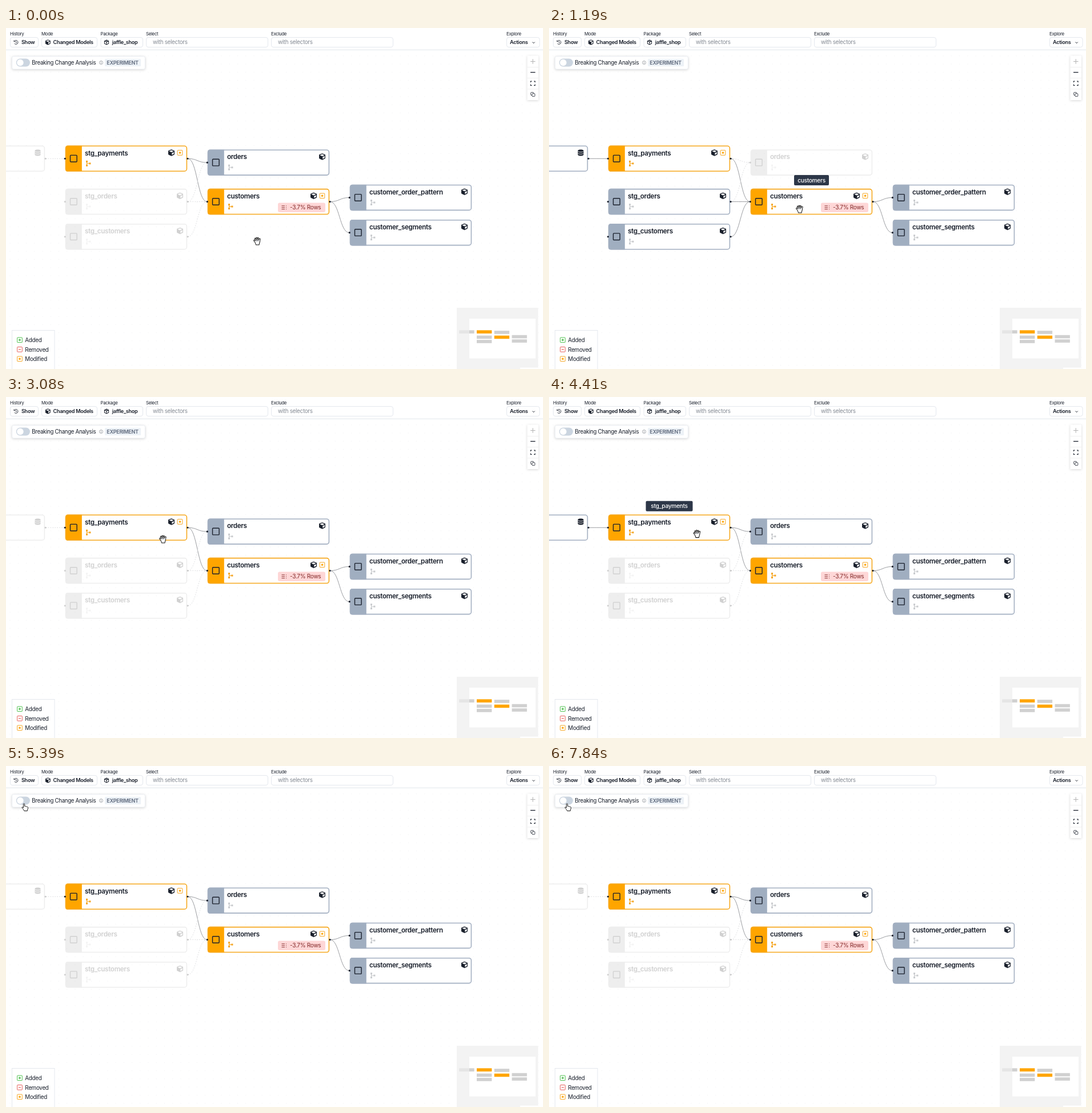
Write an HTML page that moves like this. It is 940 by 596 pixels and loops after 8 s.

```html
<!DOCTYPE html>
<html lang="en">
<head>
<meta charset="utf-8">
<title>Lineage graph</title>
<style>
html, body { margin: 0; width: 100%; height: 100%; overflow: hidden; background: #fff; }
svg { display: block; width: 940px; height: 596px; font-family: Inter, "Liberation Sans", sans-serif; letter-spacing: -.02em; fill: #1a202c; }
.label { font-size: 7.9px; }
.button { font-size: 9.15px; font-weight: 600; }
.hint { font-size: 9.9px; fill: #858b94; }
.box { fill: #fff; stroke: #e4e8ee; }
.title { font-size: 11.65px; font-weight: 600; }
.legend { font-size: 9.9px; }
.line { fill: none; stroke: #1a202c; }
.edge { fill: none; stroke: #8f9196; stroke-width: .9; }
.edge.dim { stroke: #dcdddf; stroke-dasharray: 2 2; }
.node.dim { opacity: .2; filter: grayscale(1); }
.float { filter: drop-shadow(0 1px 2px rgba(0, 0, 0, .16)); }
</style>
</head>
<body>
<svg id="stage" viewBox="0 0 940 596"></svg>
<script>
const INK = '#1a202c', ORANGE = '#ffa500', SLATE = '#a0aec0';
const W = 213.4, H = 45.5;

const rect = (x, y, w, h, attrs = '') => `<rect x="${x}" y="${y}" width="${w}" height="${h}" ${attrs}/>`;
const text = (x, y, cls, str, attrs = '') => `<text x="${x}" y="${y}" class="${cls}" ${attrs}>${str}</text>`;
const path = (d, attrs = 'class="line"') => `<path d="${d}" ${attrs}/>`;
const at = (x, y, body, attrs = '', scale = 1) => `<g transform="translate(${x} ${y}) scale(${scale})" ${attrs}>${body}</g>`;
const dot = (x, y, r, attrs = '') => `<circle cx="${x}" cy="${y}" r="${r}" ${attrs}/>`;

// Icons, each centred on its own origin
const HEX = 'M0-5.6L5-3V3L0 5.6L-5 3V-3Z';
const cube = path('M0-5.2L5-3.3V2.9L0 5.3L-5 2.9V-3.3Z', `fill="${INK}" stroke="${INK}" stroke-width="1" stroke-linejoin="round"`) +
  path('M0-4.3L4.2-2.7L0-.9L-4.2-2.7ZM.8 .4L4.3-1.1V2L.8 3.8Z', 'fill="#fff"');
const cubeLine = path(HEX + 'M-5-3L0-.3L5-3M0-.3V5.6M-2.5-4.3L2.5-1.7', 'class="line" transform="scale(.72)" stroke-width="1.4"');
const database = path('M-5-3.6C-5-6.2 5-6.2 5-3.6V3.6C5 6.2-5 6.2-5 3.6Z', `fill="${INK}"`) +
  path('M-5-2.4C-4-.6 4-.6 5-2.4M-5 1C-4 2.8 4 2.8 5 1', 'fill="none" stroke="#fff" stroke-width=".9"');
const change = (color, mark) => rect(-4.3, -4.3, 8.6, 8.6, `rx=".6" fill="#fff" stroke="${color}"`) + mark;
const modified = change('#f5a623', dot(0, 0, 1.8, `fill="${ORANGE}"`));
const added = change('#4fc04f', path('M-2 0H2M0-2V2', 'stroke="#4fc04f" stroke-width="1.4"'));
const removed = change('#e8605c', path('M-2 0H2', 'stroke="#e8605c" stroke-width="1.2"'));
const tree = color => at(0, 0, rect(-4, -5, 3, 3) + rect(-4, 2, 3, 3) + rect(1.4, -1.5, 3, 3) +
  path('M-2.5-3V3M-2.5 0H2', `stroke="${color}" stroke-width="1.1"`), `fill="${color}"`);

// name: x, y, title, changed
const nodes = {
  source: [-145.2, 205.5, ''],
  pay: [103.8, 205.5, 'stg_payments', 1],
  ord: [103.8, 280.8, 'stg_orders'],
  cust: [103.8, 342, 'stg_customers'],
  orders: [352.8, 212.4, 'orders'],
  customers: [352.8, 280.8, 'customers', 1],
  pattern: [601.8, 273.7, 'customer_order_pattern'],
  segments: [601.8, 334.9, 'customer_segments']
};
const edges = ['source pay', 'pay orders', 'pay customers', 'ord orders', 'ord customers',
  'cust customers', 'customers pattern', 'customers segments'].map(e => e.split(' '));

function nodeMarkup([name, [x, y, title, changed]]) {
  const color = changed ? ORANGE : SLATE, right = 200.7;
  let s = rect(0, 0, W, H, 'rx="4.5" fill="#fff"') +
    path(`M29 0H4.5Q0 0 0 4.5V${H - 4.5}Q0 ${H} 4.5 ${H}H29Z`, `fill="${color}"`) +
    rect(.8, .8, W - 1.6, H - 1.6, `class="border" rx="4" fill="none" stroke="${changed ? '#f6a81e' : '#a3afc1'}" stroke-width="1.6"`) +
    rect(8.7, 16.9, 11.6, 11.6, 'class="line" rx="1" stroke-width="1.4"') +
    text(34.2, 17, 'title', title) +
    at(40.2, 31.3, tree(changed ? '#f5a623' : '#c9cbce')) +
    at(changed ? right - 15 : right, 12.5, name == 'source' ? database : cube);
  if (changed) s += at(right, 12.5, modified);
  if (name == 'customers') {
    s += rect(123.2, 24.6, 83, 16.5, 'rx="3" fill="#fed7d7"') +
      path('M129.7 30H135.2M129.7 32.9H135.2M129.7 35.8H135.2M137.2 30H138.2M137.2 32.9H138.2M137.2 35.8H138.2', 'stroke="#822727" stroke-width=".9"') +
      text(144.2, 36.5, '', '-3.7% Rows', 'font-size="10.1" fill="#822727"');
  }
  if (name != 'source') s += dot(-.5, H / 2, 1.6);
  if (edges.some(e => e[0] == name)) s += dot(W + .8, H / 2, 1.6);
  return at(x, y, s, `class="node" id="${name}"`);
}

function edgeMarkup([a, b]) {
  const x1 = nodes[a][0] + W + 1, y1 = nodes[a][1] + H / 2;
  const x2 = nodes[b][0] - 1, y2 = nodes[b][1] + H / 2, m = (x1 + x2) / 2;
  return path(`M${x1} ${y1}C${m} ${y1} ${m} ${y2} ${x2} ${y2}`, 'class="edge"');
}

const field = (x, w, label, body) => text(x, 13, 'label', label) +
  rect(x + .5, 16.5, w, 17, 'class="box" rx="3.5"') + body;

const toolbar = rect(0, 0, 940, 38, 'fill="#fff"') + rect(0, 37.7, 940, 1, 'fill="#e2e5ea"') +
  field(7, 49, 'History', text(27, 28, 'button', 'Show') +
    at(17.5, 25, path('M-3-1.6A3.4 3.4 0 1 1-2.6 2.2M-3.6-3.4V-1.4H-1.6M0-1.8V.3L1.5 1.1', 'class="line" stroke-width=".9"'))) +
  field(62, 97, 'Mode', text(82.5, 28, 'button', 'Changed Models') + at(73.3, 25, cube, '', .8)) +
  field(165.5, 73.5, 'Package', text(185.7, 28, 'button', 'jaffle_shop') + at(176, 25, cubeLine)) +
  field(245, 213, 'Select', text(257, 28.4, 'hint', 'with selectors')) +
  field(464, 213, 'Exclude', text(476, 28.4, 'hint', 'with selectors')) +
  field(876, 57.5, 'Explore', text(882, 28, 'button', 'Actions') + path('M921.5 24.6L923.6 26.7L925.7 24.6'));

const panel = rect(10.5, 49.5, 233, 22.5, 'class="float" rx="3" fill="#fff" stroke="#e6eaf0" stroke-width=".8"') +
  rect(17.8, 53.4, 24.2, 14.2, 'id="track" rx="7.1"') + dot(0, 60.5, 5.75, 'id="knob" fill="#fff"') +
  text(45.3, 63.8, '', 'Breaking Change Analysis', 'font-size="9.7"') +
  dot(166.5, 60.5, 3, 'fill="none" stroke="#6b6f78" stroke-width=".6"') +
  path('M166.5 60.1V62.2M166.5 58.6V59.3', 'stroke="#6b6f78" stroke-width=".7"') +
  rect(173, 54, 63, 13, 'rx="1.5" fill="#edf2f7"') +
  text(176.3, 63.6, '', 'EXPERIMENT', 'font-size="9" font-weight="700" fill="#6b7587"');

const controls = rect(912.5, 48.5, 19.5, 77.5, 'fill="#fff" class="float"') +
  [68, 87, 106.5].map(y => rect(912.5, y, 19.5, .8, 'fill="#eee"')).join('') +
  path('M918 58.5H926.5M922.2 54.2V62.8', 'stroke="#b5b5b5" stroke-width="1.1"') +
  path('M918 77.5H926.5', 'class="line" stroke-width="1.3"') +
  path('M918.5 95V93H920.5M924 93H926V95M926 98.5V100.5H924M920.5 100.5H918.5V98.5', 'class="line" stroke-width="1.2"') +
  rect(918.6, 112.5, 5, 5, 'class="line" rx="1" stroke-width=".8"') +
  rect(920.8, 114.6, 5, 5, 'class="line" rx="1" stroke-width=".8" style="fill:#fff"');

const legend = rect(10.5, 528.5, 74.5, 70, 'class="box"') +
  [['Added', added], ['Removed', removed], ['Modified', modified]].map(([name, icon], i) =>
    at(24, 545.3 + i * 16.5, icon + text(9.3, 3.7, 'legend', name))).join('');

function minimap() {
  const k = .1235;
  const bars = Object.values(nodes).map(([x, y, , changed]) =>
    rect(824 + (x - nodes.pay[0]) * k, 528.3 + (y - nodes.pay[1]) * k, W * k, H * k, `fill="${changed ? ORANGE : '#d0d0d0'}"`));
  return rect(789, 489, 142.5, 107, 'fill="#fff"') + bars.join('') +
    path('M789 489H931.5V596H789ZM811 508V577.5H927V508Z', 'fill="rgba(238,238,238,.7)" fill-rule="evenodd"') +
    rect(900, 593.5, 31.5, 3, 'fill="#fff"');
}

// Tooltips: shown from, hidden from, node, width
const tips = [[980, 2830, 'customers', 61], [3150, 4715, 'pay', 82]];
const tipMarkup = ([, , name, w]) => `<g class="tip">` + rect(-w / 2, -9, w, 18, 'rx="2" fill="#2d3748"') +
  text(0, 3.5, '', nodes[name][2], 'font-size="10.2" font-weight="500" fill="#fff" text-anchor="middle"') + '</g>';

const cursorStyle = `fill="#fff" stroke="#111" stroke-width=".95" stroke-linejoin="round"`;
const cursors = `<g id="cursor">` +
  at(0, -.3, path('M-4.2 1.2L-5.8-.6C-6.6-1.8-5.2-2.6-4.4-1.7L-3.4-.7L-4.4-3.8C-4.7-5.2-3.2-5.6-2.7-4.4L-1.9-2.2L-2-5.3' +
    'C-2-6.6-.3-6.6-.2-5.3L0-2.4L.6-5.2C.9-6.4 2.4-6 2.2-4.8L1.9-2L3.2-4C3.9-5 5.3-4.2 4.8-3.1' +
    'C4-1 4.6 1 3.4 3.2L2.8 6L-2.4 6C-2.6 4-3.4 3-4.2 1.2Z', cursorStyle) +
    path('M-1.9-2.2L-1.5 0M0-2.4V-.2M1.9-2L1.5 0', 'class="line" stroke-width=".7"'), 'id="hand"', 1.06) +
  path('M-1.2.9C-1.2-.6 1-.6 1 .9L1 4.4C1.4 3.8 3 4 3.1 5C3.6 4.3 5 4.6 5.1 5.5C5.8 5 7 5.5 6.9 6.6' +
    'C6.9 9 6.2 9.5 5.8 11L5.7 12.5L.2 12.5C-.3 10.5-2 9-3.4 7.2C-4.2 6-2.8 5.2-2 6.2L-1.2 7.2Z', `id="finger" ${cursorStyle}`) + '</g>';

const stage = document.getElementById('stage');
stage.innerHTML = '<defs><pattern id="dots" width="14.23" height="14.23" patternUnits="userSpaceOnUse">' +
  dot(7, 6, .5, 'fill="#e6e7ea"') + '</pattern></defs>' +
  rect(0, 38, 940, 558, 'fill="url(#dots)"') +
  edges.map(edgeMarkup).join('') + Object.entries(nodes).map(nodeMarkup).join('') +
  toolbar + panel + controls + legend + minimap() + tips.map(tipMarkup).join('') +
  dot(30.5, 65.5, 23.3, 'id="ring" fill="none" stroke="#333" stroke-width="1.6"') + cursors;

const $ = id => document.getElementById(id);
const edgeEls = [...stage.querySelectorAll('.edge')], tipEls = [...stage.querySelectorAll('.tip')];
const clamp = p => Math.min(1, Math.max(0, p));
const smooth = p => (p = clamp(p), p * p * (3 - 2 * p));
const during = (t, a, b) => t >= a && t < b;

// Pointer moves: start, end, x, y, skew of the easing
const moves = [
  [490, 1190, 439, 317, .8],
  [2240, 3080, 275, 249, 1.78],
  [3080, 3360, 260, 240, 1],
  [4340, 5180, 55, 84, 1.4],
  [5180, 5390, 31.6, 66, .7]
];

function pointerAt(t) {
  let x = 440, y = 373;
  for (const [a, b, tx, ty, skew] of moves) {
    const p = smooth(clamp((t - a) / (b - a)) ** skew);
    x += (tx - x) * p;
    y += (ty - y) * p;
  }
  return [x, y];
}

function litNodes(t) {
  const base = 'pay customers pattern segments ';
  if (during(t, 6090, 7770)) return base;
  if (during(t, tips[0][0], tips[0][1])) return base + 'source ord cust';
  return base + 'orders' + (during(t, tips[1][0], tips[1][1]) ? ' source' : '');
}

function render(t) {
  const lit = new Set(litNodes(t).trim().split(' '));
  for (const name in nodes) $(name).classList.toggle('dim', !lit.has(name));
  edges.forEach(([a, b], i) => edgeEls[i].classList.toggle('dim', !(lit.has(a) && lit.has(b))));
  $('pay').querySelector('.border').setAttribute('stroke-dasharray', during(t, 6090, 7770) ? '4.3 2.8' : 'none');

  tips.forEach(([show, hide, name], i) => {
    const [x, y] = nodes[name], gone = t - hide;
    const alpha = smooth((t - show + 35) / 200) * (1 - smooth(gone / 145));
    const scale = .85 + .15 * (gone > 0 ? 1 - smooth(gone / 125) : smooth((t - show + 35) / 200));
    tipEls[i].setAttribute('opacity', t < show ? 0 : alpha);
    tipEls[i].setAttribute('transform', `translate(${x + W / 2} ${y - 14.8}) scale(${scale})`);
  });

  const on = smooth((t - 5845) / 200) - smooth((t - 7595) / 200);
  const mix = (a, b) => Math.round(a + (b - a) * on);
  $('track').setAttribute('fill', `rgb(${mix(203, 49)},${mix(213, 130)},${mix(224, 206)})`);
  $('knob').setAttribute('cx', 24.9 + 10 * on);
  $('ring').setAttribute('opacity', during(t, 5810, 5950) || during(t, 7490, 7630) ? .8 : 0);

  const [x, y] = pointerAt(t), over = t >= 5320;
  $('cursor').setAttribute('transform', `translate(${x} ${y})`);
  $('hand').setAttribute('opacity', over ? 0 : 1);
  $('finger').setAttribute('opacity', over ? 1 : 0);
}

// The picture advances once per 70 ms
function tick() {
  const t = performance.now() % 8000;
  render(Math.floor(t / 70) * 70);
  requestAnimationFrame(tick);
}
tick();
</script>
</body>
</html>
```
